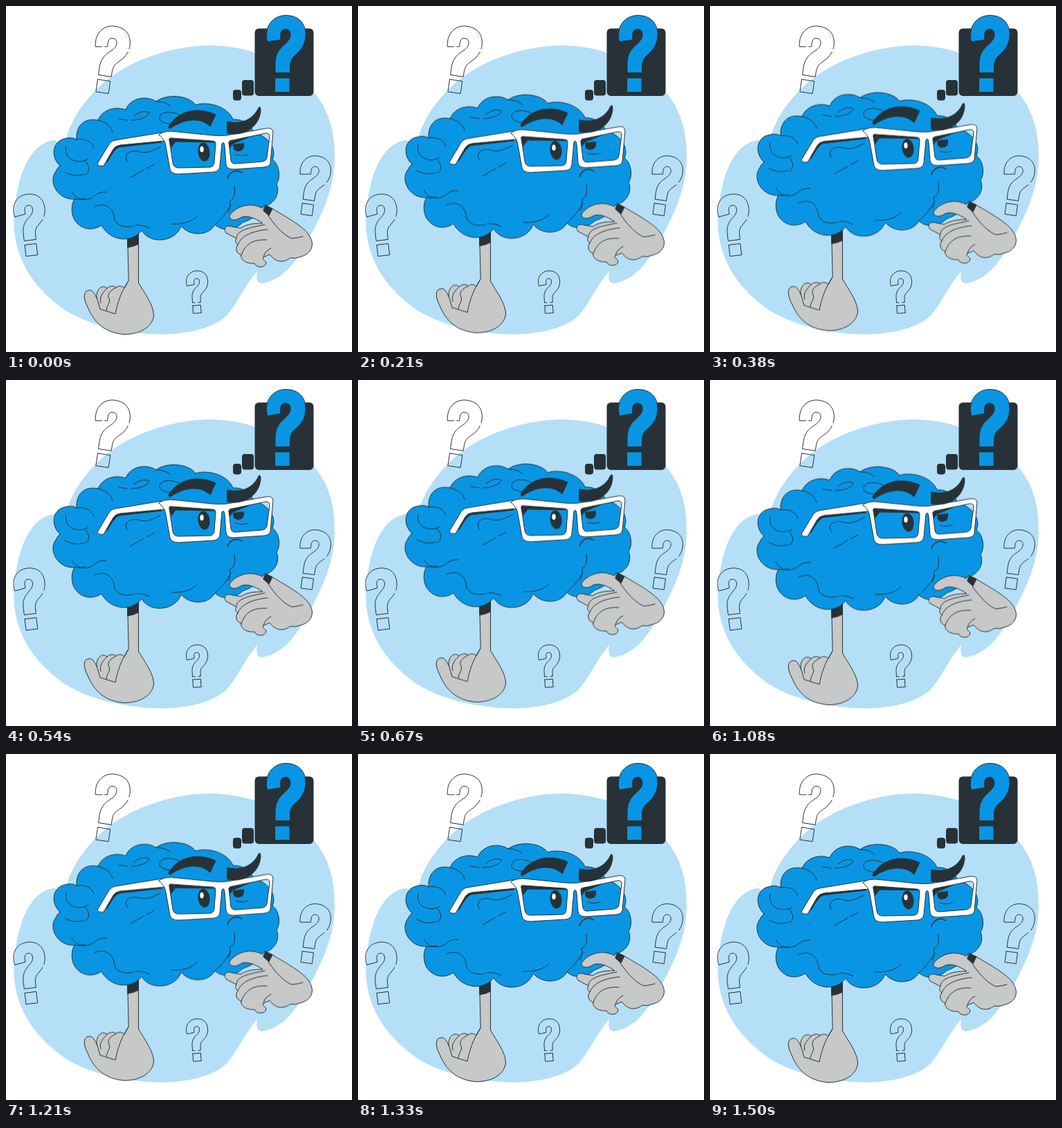
An HTML page that plays this animation: 500x500 px, repeating every 1540 ms.

```html
<!DOCTYPE html>
<html lang="en">
<head>
<meta charset="utf-8">
<title>Thinking brain</title>
<style>
  html, body { margin: 0; width: 100%; height: 100%; overflow: hidden; background: #fff; }
  svg { display: block; width: 100%; height: 100%; }
  .line { fill: none; stroke: #263238; stroke-width: 1; stroke-linecap: round; stroke-linejoin: round; }
  .blue { fill: #0896e4; }
  .gray { fill: #c7c8c8; }
  .white { fill: #fff; }
  .dark { fill: #263238; }
  .hollow { stroke-dasharray: 92 5 150 4 400; }
  #thinker { animation: float 770ms cubic-bezier(.37, 0, .63, 1) -45ms infinite alternate; }
  @keyframes float { to { transform: translateY(-9.4px); } }
</style>
</head>
<body>
<svg viewBox="0 0 500 500">
  <defs>
    <path id="mark" vector-effect="non-scaling-stroke" d="M-27 -18 C-32 -40 -19 -56 0 -56 C18 -56 28.500 -45 28.500 -28 C28.500 -15 23 -7 15 0 C8 6 6 11 6 19 V27 H-15.500 V14 C-15.500 2 -11 -6 -3 -13 C4 -19 6.500 -23 6.500 -28 C6.500 -33 4 -36 -.5 -36 C-7 -36 -8.500 -31 -7.500 -21Z M-15.500 34.500 H5.500 V55 H-15.500Z"/>
  </defs>

  <path fill="#b4dff7" d="M68 194 C45 198 31 219 22 245 C13 275 10 300 12 325 C16 370 42 410 86 440 C120 461 172 474.500 227 474.500 C264 474 300 465 318 448 C334 431 343 407 363 383 C360 400 366 402 374 400 C402 393 418 371 435 341 C456 303 475 264 475 218 C475 181 467 149 442 121 C402 77 349 57 293 57 C238 58 180 78 142 110 C121 128 103 151 93 174 C86 190 86 207 76 200 Q73 193 68 194Z"/>

  <g class="line hollow">
    <use href="#mark" transform="translate(150.500 78) rotate(8.500) scale(.88)"/>
    <use href="#mark" transform="translate(36 316.500) rotate(-7) scale(.8)"/>
    <use href="#mark" transform="translate(444 260) rotate(8) scale(.78)"/>
    <use href="#mark" transform="translate(277 413.500) rotate(-4) scale(.55)"/>
  </g>

  <g class="dark">
    <rect x="359.500" y="32.500" width="85" height="97.500" rx="6"/>
    <rect x="341" y="107" width="17" height="22.500" rx="4"/>
    <rect x="328" y="121" width="12" height="15.500" rx="4"/>
  </g>
  <g class="line"><use href="#mark" class="blue" transform="translate(404.500 69.500)"/></g>

  <g id="thinker" class="line">
    <!-- standing arm -->
    <path class="gray" d="M176 330 H191.500 V400 C200 415 214 433 213.500 448 C211 465 192 475 170 474.500 C142 472 127 457 118 435 C111 422 112 412 119 411 C126 409 129 418 131 422 C130 408 140 402 146 408 C150 404 157 404 159 407 C162 404 168 404 171 408 L177 397Z"/>
    <path d="M131 421 L136 438 L158 445 C161 430 166 413 177 397 M146 408 C140 414 134 421 137 429 M159 407 C149 412 146 417 149 423 C152 428 145 433 145 440"/>
    <path class="dark" d="M176 328 H191.500 V344 Q184 348 176 349Z"/>

    <!-- brain -->
    <path class="blue" d="M78 231 C64 218 67 196 84 192 C91 190 97 190 102 193 C101 174 112 161 133 165 C139 151 156 144 173 150 C179 134 201 128 217 138 C231 127 263 128 274 143 C293 137 321 146 328 164 C342 163 354 171 358 183 C374 186 393 203 385 222 C397 231 396 251 391 257 C396 270 390 283 376 289 C366 301 354 309 342 313 C332 323 313 327 302 316 C294 331 268 335 253 318 C245 342 207 345 196 324 C183 343 151 341 138 317 C124 326 108 323 99 309 C93 298 95 285 99 279 C76 281 60 255 72 239 Q74 234 78 231Z"/>
    <path d="M87 203 C82 220 103 231 119 221 M102 193 C115 191 124 196 127 205 M113 223 C122 231 121 240 115 244 M85 240 C96 246 105 246 113 243 M95 268 C103 284 120 281 127 275 Q134 268 145 269 M99 279 C106 280 110 279 114 278"/>
    <path d="M128 290 C145 282 156 294 157 309 C161 318 172 321 184 318 M187 317 C194 316 201 318 207 321 M239 315 C258 316 269 311 276 304 M133 165 C145 168 152 174 154 182 M163 163 L175 165 M181 165 C197 165 207 158 207 154 C198 150 190 155 185 159 M217 138 C225 138 232 140 238 145 M250 157 C235 150 221 154 222 163 C223 168 231 170 240 171"/>
    <path d="M176 225 C168 215 179 206 194 211 C205 214 214 208 223 204 M180 248 L199 237 M203 235 L214 229 M302 316 C312 307 319 298 325 287 M330 261 C332 274 329 279 323 282 C325 288 324 292 321 298"/>
    <path stroke-width="1.500" d="M320 249 C324 238 334 236 341 241"/>

    <!-- eyes -->
    <g stroke="none">
      <ellipse class="dark" cx="286" cy="211" rx="8.500" ry="13.500" transform="rotate(-7 286 211)"/>
      <ellipse class="white" cx="283" cy="207" rx="2.700" ry="4.300"/>
      <path class="dark" d="M328 200 L344 198 Q345 207 340 209 Q333 212 329 207Z"/>
    </g>
    <path d="M332 215 Q341 218 350 215"/>

    <!-- glasses -->
    <path class="dark" d="M154 202 L225 194 V197 L163 204 Q156 207 146 226Z"/>
    <path class="white" d="M225 183 L158 194 Q151 195 147 203 L132 228 Q133 232 141 231 L155 207 Q158 202 165 201 L229 195Z"/>
    <path class="dark" d="M235 190 L302 193 V197 L245 196 L239 204Z M321 195 L352 189 L328 199 L323 205Z"/>
    <path class="white" fill-rule="evenodd" d="M221 186 Q226 181 239 181 L298 187 Q310 188 319 187 L375 177 Q385 175 386 182 L382 227 Q381 232 373 233 L329 236 Q319 236 318 229 L316 202 Q315 195 312 199 L309 232 Q308 239 300 240 L249 243 Q239 243 237 236 L231 203 Q230 193 221 186Z M236 194 L241 227 Q242 234 250 234 L295 233 Q301 232 301 225 L303 199 Q303 195 297 195 L240 191 Q235 190 236 194Z M322 198 L325 223 Q326 228 331 228 L370 225 Q376 224 377 219 L381 189 Q381 183 375 184 L327 194 Q322 194 322 198Z"/>

    <!-- brows -->
    <path class="dark" d="M235 174 C249 151 277 145 303 157 L295 174 C281 160 257 163 237 177Z"/>
    <path class="dark" d="M320 167 C341 172 358 163 365 147 Q368 144 368 151 C366 177 341 189 320 184Z"/>

    <!-- raised arm -->
    <path class="gray" d="M374 288 L385 293 C405 305 429 318 437 330 C448 345 441 358 427 362 Q418 366 411 364 C398 373 389 369 381 359 L372 363 C369 367 375 367 376 371 C375 379 362 379 359 372 C347 373 338 366 340 360 C332 357 331 350 335 345 C331 342 331 339 333 336 L318 328 C313 321 319 316 327 319 L339 321 C348 315 359 314 371 314 C358 305 346 302 339 306 C331 312 322 309 323 303 C331 291 351 282 370 292Z"/>
    <path d="M379 303 C391 321 403 332 413 336 Q423 335 429 333 M333 335 C334 324 349 321 374 316 M335 345 C340 331 358 325 378 323 M340 360 C346 343 358 337 377 338 M372 363 Q374 354 383 350"/>
    <path class="dark" d="M375 288 L385 293 L380 303 L372 296Z"/>
  </g>
</svg>
</body>
</html>
```
